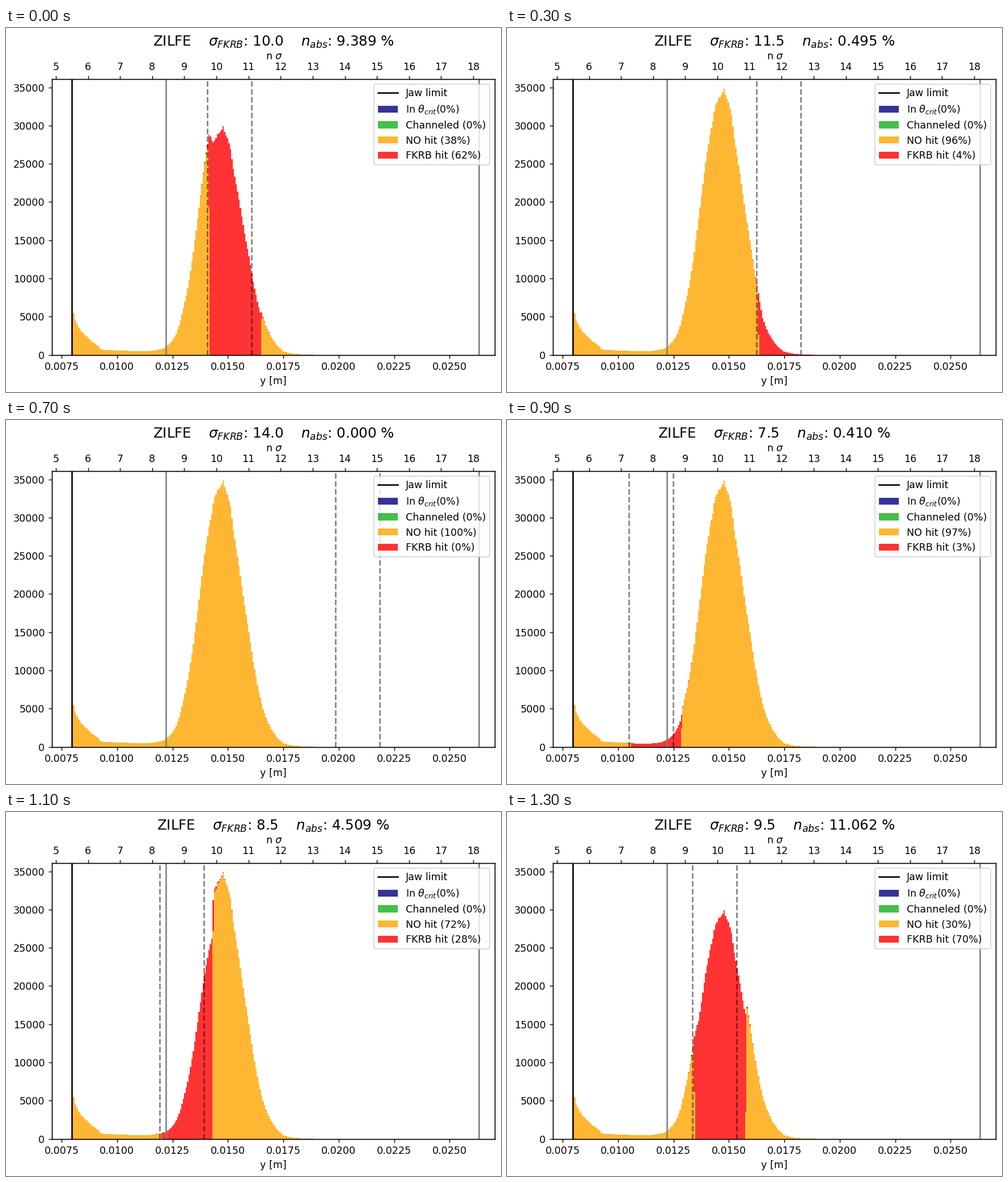
A matplotlib script that plays this animation: 873x641 px, repeating every 1400 ms.

```python
import numpy as np
import matplotlib.pyplot as plt
from matplotlib.animation import FuncAnimation
from matplotlib.lines import Line2D
from matplotlib.patches import Patch

W, H, DPI = 873, 641, 126
LEFT, RIGHT, TOP, BOTTOM = 80.6, 861.8, 90.5, 575.6
PX_PER_M = 39103
JAW, BIN = 115.9, 2.51

# sigma setting, absorbed share (%), hit share (%)
SCAN = [
    (10.0, 9.389, 62), (10.5, 5.311, 36), (11.0, 1.972, 14), (11.5, 0.495, 4),
    (12.0, 0.092, 1), (12.5, 0.014, 0), (13.0, 0.002, 0), (14.0, 0.000, 0),
    (7.0, 0.190, 2), (7.5, 0.410, 3), (8.0, 1.452, 9), (8.5, 4.509, 28),
    (9.0, 8.784, 56), (9.5, 11.062, 70),
]

# outline of the distribution: stage x, count
OUTLINE = np.array([
    (117, 5800), (120, 5400), (122, 4600), (126, 3950), (132, 3150), (140, 2550),
    (150, 1850), (162, 1150), (167, 750), (173, 620), (190, 600), (200, 560),
    (230, 500), (255, 520), (265, 600), (273, 750), (280, 950), (286, 1300),
    (292, 1750), (300, 2700), (307, 4200), (312, 5800), (320, 8500),
    (325, 10700), (330.5, 13400), (338.5, 18100), (346, 22600), (351.5, 25800),
    (355.5, 27500), (358.5, 29000), (364, 30800), (367, 32650), (370, 32800),
    (372.5, 33600), (377, 33800), (380.5, 34350), (383.3, 34900), (386, 33900),
    (391, 33000), (396, 31300), (401, 28200), (410, 24100), (421, 18400),
    (428, 15200), (436, 11100), (444.5, 7700), (452, 5300), (460, 3500),
    (469, 2200), (479, 1150), (489, 500), (502, 200), (520, 60), (545, 0),
])


def to_m(px):
    return 0.0075 + (px - 98) / PX_PER_M


edges = JAW + BIN * np.arange(172)
mid = (edges[:-1] + edges[1:]) / 2
full = np.interp(mid, *OUTLINE.T)


def slit(sigma):
    """Stage x of the two dashed lines; they lie 2 mm apart."""
    x = 214.5 + 56.31 * (sigma - 7.5)
    return x, x + 0.002 * PX_PER_M


def split_counts(sigma):
    """Counts without a hit, and the top of the stack including hits."""
    x1, x2 = slit(sigma)
    lo, hi = x1 + 3.3, x2 + 15.1 + 0.6 * (sigma - 7.5)
    overlap = np.minimum(edges[1:], hi) - np.maximum(edges[:-1], lo)
    cover = np.clip(overlap / BIN, 0, 1)
    distance = np.maximum(np.maximum(lo - mid, mid - hi), 0)
    stray = 0.02 * np.exp(-distance / 8)
    absorbed = 0.142 * cover * np.clip((mid - lo) / 8, 0, 1)
    return full * (1 - cover) * (1 - stray), full * (1 - absorbed)


plt.rcParams["font.family"] = "DejaVu Sans"
fig = plt.figure(figsize=((W + 1e-6) / DPI, (H + 1e-6) / DPI), dpi=DPI,
                 facecolor="white")
ax = fig.add_axes([LEFT / W, 1 - BOTTOM / H, (RIGHT - LEFT) / W, (BOTTOM - TOP) / H])
ax.set_xlim(to_m(LEFT), to_m(RIGHT))
ax.set_ylim(0, 36050)
ax.set_xticks(np.arange(3, 11) * 0.0025)
ax.xaxis.set_major_formatter("{x:.4f}")
ax.set_yticks(range(0, 35001, 5000))
ax.set_xlabel("y [m]")

top = ax.twiny()
top.set_xlim(4.869, 18.667)
top.set_xticks(range(5, 19))
fig.text(473 / W, 1 - 54.5 / H, r"n $\sigma$", ha="center", va="baseline")
title = fig.text(471.3 / W, 1 - 31.5 / H, "", fontsize=14, ha="center", va="baseline")

zeros = np.zeros_like(mid)
no_hit = ax.stairs(zeros, to_m(edges), baseline=0, fill=True,
                   color="orange", alpha=0.8, linewidth=0)
hit = ax.stairs(zeros, to_m(edges), baseline=zeros, fill=True,
                color="red", alpha=0.8, linewidth=0)

ax.axvline(to_m(JAW), color="black", lw=1.5)
for px in (282.4, 833.7):
    ax.axvline(to_m(px), color="gray", lw=1.5)
dashed = [ax.axvline(0.01, color="black", alpha=0.5, lw=1.5, ls="--")
          for _ in range(2)]

handles = [Line2D([], [], color="black", lw=1.5)]
handles += [Patch(color=c, alpha=0.8, linewidth=0)
            for c in ("navy", "xkcd:green", "orange", "red")]
legend = ax.legend(handles, ["Jaw limit", r"In $\theta_{crit}$(0%)", "Channeled (0%)",
                             "NO hit (0%)", "FKRB hit (0%)"],
                   loc="upper right", fontsize=10)
no_hit_label, hit_label = legend.get_texts()[3:]


def update(frame):
    sigma, absorbed, hit_share = SCAN[frame]
    clear, total = split_counts(sigma)
    no_hit.set_data(values=clear)
    hit.set_data(values=total, baseline=clear)
    for line, px in zip(dashed, slit(sigma)):
        line.set_xdata([to_m(px)] * 2)
    no_hit_label.set_text(f"NO hit ({100 - hit_share}%)")
    hit_label.set_text(f"FKRB hit ({hit_share}%)")
    title.set_text(rf"ZILFE    $\sigma_{{FKRB}}$: {sigma:.1f}    "
                   rf"$n_{{abs}}$: {absorbed:.3f} %")
    return [no_hit, hit, *dashed, title, legend]


anim = FuncAnimation(fig, update, frames=len(SCAN), interval=100,
                     repeat=True, repeat_delay=0, blit=False)
plt.show()
```
